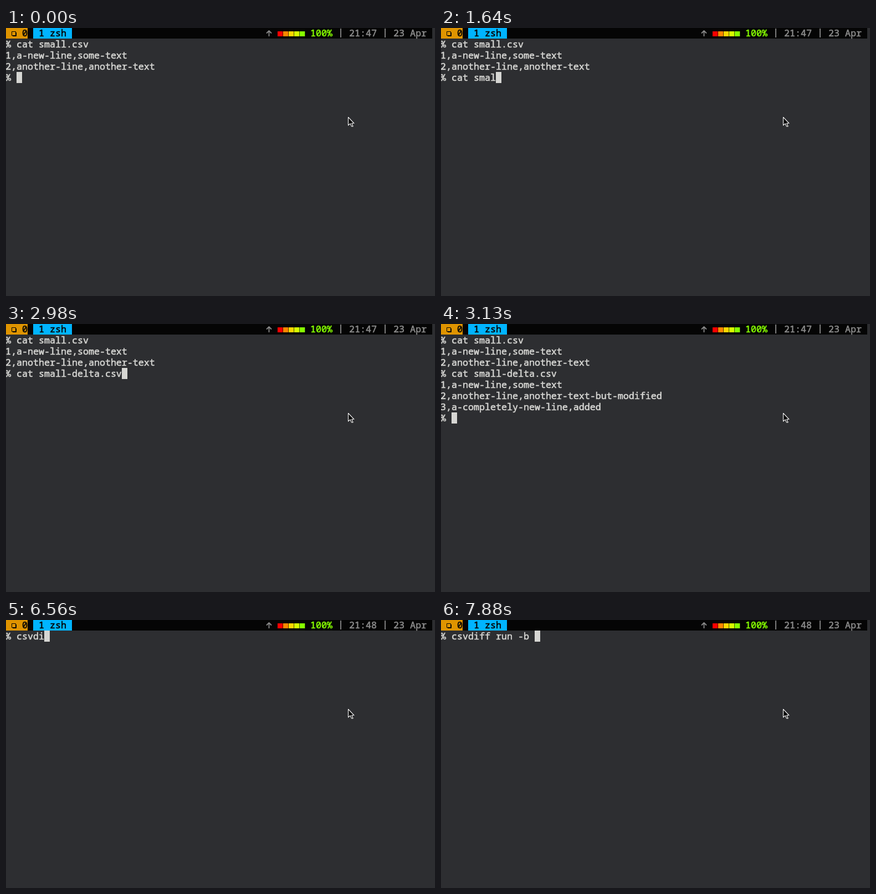
Write an HTML page with a canvas that moves like this. It is 774x482 px and loops after 8 s.

```html
<!DOCTYPE html>
<html lang="en">
<head>
<meta charset="utf-8">
<title>Terminal</title>
<style>
  html, body { margin: 0; width: 100%; height: 100%; overflow: hidden; background: #2d2e31; }
  canvas { display: block; }
</style>
</head>
<body>
<canvas id="stage" width="774" height="482"></canvas>
<script>
const ctx = document.getElementById('stage').getContext('2d');
const LOOP = 8000, KEY = 147.5, ENTER = 2980, OUTPUT = 3130, CLEARED = 5370;
const COL = 10, ROW = 20;
const LIGHT = '#d6d6d3', GREY = '#8a8a8a', GREEN = '#87ff00', BLACK = '#050505';

const first = ['% cat small.csv', '1,a-new-line,some-text', '2,another-line,another-text'];
const second = ['1,a-new-line,some-text', '2,another-line,another-text-but-modified', '3,a-completely-new-line,added'];

// The head appears at once, the tail follows one key at a time.
function burst(t, start, head, tail = '') {
  return t < start ? '' : head + tail.slice(0, Math.floor((t - start) / KEY));
}

function catCommand(t) {
  const text = burst(t, 750, 'ca', 't small') + burst(t, 2090, '-', 'de') + burst(t, 2540, 'lta.csv ');
  return '% ' + (t < ENTER ? text : text.trim());
}

function diffCommand(t) {
  return '% ' + burst(t, 5670, 'cs', 'v') + burst(t, 6260, 'd') + burst(t, 6560, 'i') + burst(t, 6700, 'ff', ' run -b ');
}

function screenLines(t) {
  if (t >= CLEARED) return [diffCommand(t)];
  const lines = [...first, catCommand(t)];
  return t < OUTPUT ? lines : [...lines, ...second, '% '];
}

function cells(col, row, count, color) {
  ctx.fillStyle = color;
  ctx.fillRect(col * COL - 1, row * ROW - 1, count * COL, ROW);
}

// A thin outline gives the regular face a medium weight.
function print(text, col, row, color) {
  const x = col * COL - 1, y = row * ROW + 15;
  ctx.fillStyle = ctx.strokeStyle = color;
  ctx.lineWidth = 0.6;
  ctx.fillText(text, x, y);
  ctx.strokeText(text, x, y);
}

function outline(path, color, width) {
  ctx.strokeStyle = color;
  ctx.lineWidth = width;
  ctx.stroke(new Path2D(path));
}

function drawStatus(t) {
  cells(0, 0, 77, BLACK);
  cells(0, 0, 4, '#df9400');
  cells(5, 0, 7, '#00b4ff');
  outline('M10.5 6.5H17.5V13.5H10.5Z', BLACK, 1);
  outline('M12 14.5H18.5V8', BLACK, 1);
  print('0', 3, 0, BLACK);
  print('1 zsh', 6, 0, BLACK);

  outline('M474.5 15V5M470 9.5L474.5 5L479 9.5', GREY, 1.8);
  ['#ff0000', '#ff8700', '#ffd700', '#d7ff00', GREEN].forEach((color, i) => {
    ctx.fillStyle = color;
    ctx.fillRect(490 + i * COL, 6, 9.3, 9);
  });
  print('100%', 55, 0, GREEN);
  print(t < CLEARED ? '21:47' : '21:48', 62, 0, GREY);
  print('23 Apr', 70, 0, GREY);
  outline('M604 1V17M684 1V17', GREY, 1.8);
}

function drawPointer() {
  const arrow = 'M617.5 160.5V175L621 171.8L623.5 177H626L623.7 171.3H628Z';
  ctx.fillStyle = '#000';
  ctx.fill(new Path2D(arrow));
  outline(arrow, '#fff', 1.1);
}

function draw(now) {
  const t = now % LOOP;
  const lines = screenLines(t);
  ctx.fillStyle = '#2d2e31';
  ctx.fillRect(0, 0, 774, 482);
  ctx.font = '16.667px "Noto Sans Mono", monospace';
  ctx.lineJoin = 'round';
  drawStatus(t);
  lines.forEach((line, i) => print(line, 0, i + 1, LIGHT));
  cells(lines.at(-1).length, lines.length, 1, LIGHT);
  drawPointer();
  requestAnimationFrame(draw);
}
requestAnimationFrame(draw);
</script>
</body>
</html>
```
